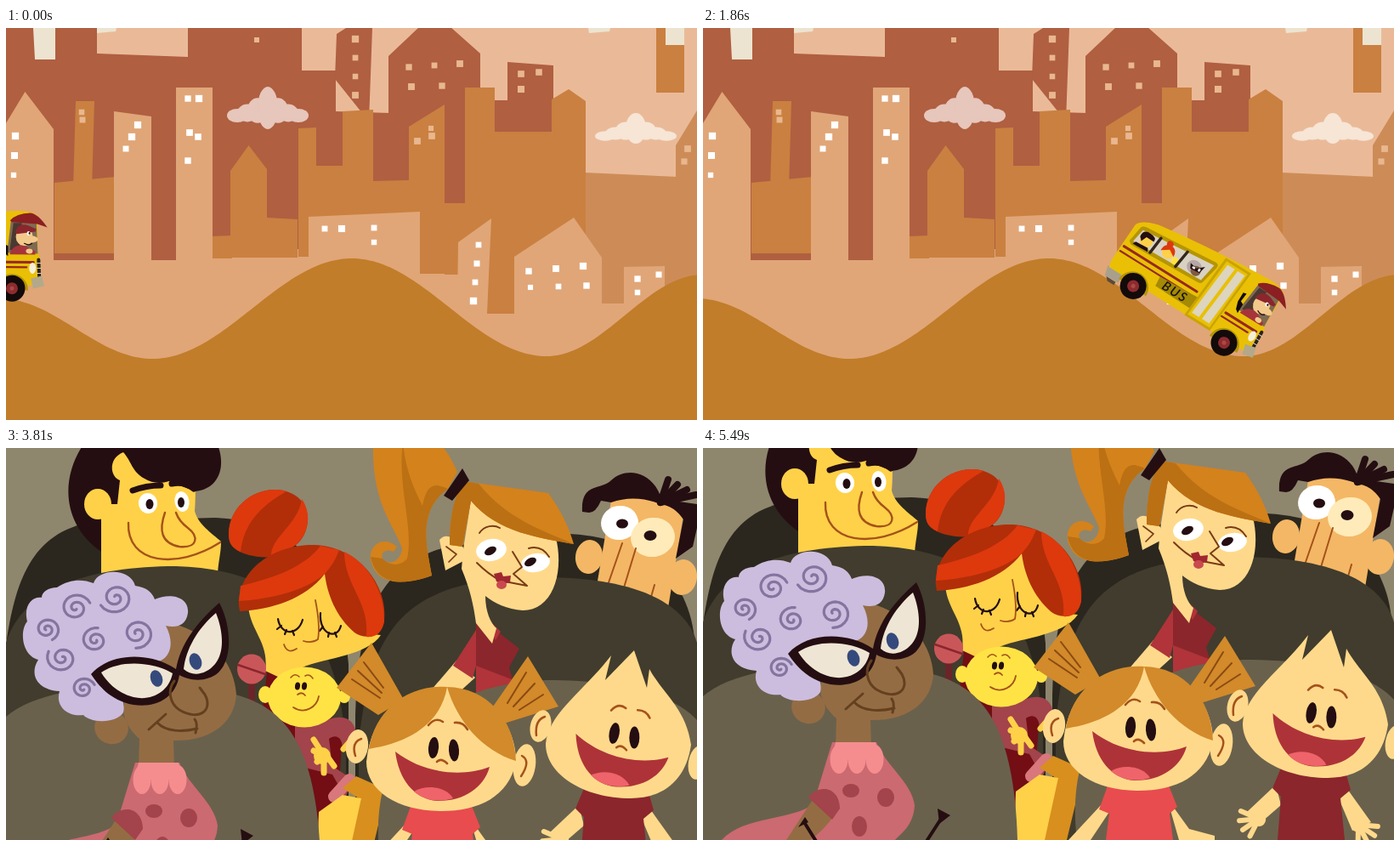
Write an HTML page that moves like this. It is 813 px wide and 461 px high and loops after 5590 ms.

```html
<!DOCTYPE html>
<html lang="en">
<head>
<meta charset="utf-8">
<title>Bus ride</title>
<style>
html, body { margin: 0; width: 100%; height: 100%; overflow: hidden; background: #8f866e; }
svg { display: block; width: 100%; height: 100%; }
text { font: italic 600 15px Lato, "Open Sans", sans-serif; letter-spacing: 2px; }
</style>
</head>
<body>
<svg id="stage" viewBox="0 0 813 461" preserveAspectRatio="none"></svg>
<script>
const LOOP = 5590, CUT = 3420;
const HILLS = [[-8, 318], [172, 389], [407, 271], [636, 386], [820, 290], [1100, 318]];
const DRIVE = [[0, -56], [750, 245], [1170, 370], [1440, 422], [1870, 626], [2430, 797], [2850, 932]];

const linear = s => s;
const wave = s => (1 - Math.cos(Math.PI * s)) / 2;
function along(keys, x, ease) {
  let i = 1;
  while (i < keys.length - 1 && x > keys[i][0]) i++;
  const [a, b] = [keys[i - 1], keys[i]];
  const s = Math.min(1, Math.max(0, (x - a[0]) / (b[0] - a[0])));
  return a[1] + (b[1] - a[1]) * ease(s);
}
const ground = x => along(HILLS, x, wave);
// The picture is held between steps of even length
const snap = (t, from, gap) => from + Math.floor((t - from) / gap) * gap;
const held = t => t < 750 ? snap(t, 0, 125) : t < CUT ? snap(t, 750, 140) : snap(t, CUT, 137);
const bounce = t => Math.min(24, Math.max(0, 12 + 16.5 * Math.cos(2 * Math.PI * (t - 4815) / 1160)));

let seed = 7;
const random = () => (seed = seed * 16807 % 2147483647) / 2147483647;

// Drawing helpers: filled path, line, ellipse, group
const p = (d, fill) => `<path d="${d}" fill="${fill}"/>`;
const l = (d, stroke, w = 2) =>
  `<path d="${d}" fill="none" stroke="${stroke}" stroke-width="${w}" stroke-linecap="round" stroke-linejoin="round"/>`;
const e = (x, y, rx, ry, fill, turn = 0) =>
  `<ellipse cx="${x}" cy="${y}" rx="${rx}" ry="${ry}" fill="${fill}" transform="rotate(${turn} ${x} ${y})"/>`;
const g = (id, ...parts) => `<g id="${id}">${parts.join('')}</g>`;
const at = (x, y, turn, ...parts) => `<g transform="translate(${x} ${y}) rotate(${turn})">${parts.join('')}</g>`;
const repeat = (n, draw) => Array.from({ length: n }, (_, i) => draw(i)).join('');

const C = { sky: '#eaba98', red: '#b05f41', mid: '#ca8040', tan: '#cd8c57', light: '#e0a678', hill: '#c17d29',
  cream: '#ece4d0', ink: '#240e11', skin: '#ffd98b', peach: '#f4b765', yellow: '#ffd148', baby: '#ffe344',
  wine: '#8b262c', crimson: '#b03439', line: '#a5521b', brown: '#946c44', rose: '#cb6a70', plum: '#a3434b',
  fire: '#dd390d', ember: '#b12e09', amber: '#d4821b', rust: '#bb7013', ginger: '#d28a2a' };

const tower = (fill, x, w, left, right, base, peak = (left + right) / 2, lean = 0.5) =>
  p(`M${x} ${left}L${x + w * lean} ${peak}L${x + w} ${right}V${base}H${x}Z`, fill);
const panes = (fill, x, y, dx, dy, n) => repeat(n, i => {
  const s = 6 + random() * 2.5;
  return `<rect x="${x + dx * i - s / 2}" y="${y + dy * i - s / 2}" width="${s}" height="${s}" fill="${fill}"/>`;
});
const cloud = (x, y, scale, fill) => repeat(7, i => {
  const k = Math.abs(i - 3);
  return e(x + 12 * (i - 3), y + 3 * k, 12, scale * 25 / (1 + 0.7 * k), fill);
});

function town() {
  let hill = 'M0 461';
  for (let x = 0; x <= 816; x += 4) hill += `L${x} ${ground(x).toFixed(1)}`;
  const { sky, red, mid, tan, light, cream } = C, pale = '#e9b78f', white = '#fff';
  return [
    p('M0 0H813V461H0Z', sky), p('M0 260H813V400H0Z', light),
    // far
    tower(red, 0, 107, 0, 0, 273), tower(red, 107, 107, 30, 34, 273), tower(red, 214, 134, 0, 0, 260),
    tower(red, 348, 40, 50, 50, 260), p('M387 60L389 7 400 0H431L427 110Z', red), tower(red, 387, 65, 98, 100, 260),
    tower(red, 450, 108, 33, 30, 260, -18), tower(red, 575, 15, 85, 85, 130), tower(red, 590, 54, 40, 44, 130),
    p('M32 0H58V37H34ZM107 0H130L129 4 107 6ZM685 0H711L710 4 686 6Z', cream),
    tower(mid, 765, 33, 0, 0, 76), tower(cream, 776, 22, 0, 0, 20),
    tower(tan, 681, 132, 170, 176, 324), tower(tan, 788, 25, 138, 97, 324),
    panes(pale, 295, 14, 0, 0, 1), panes(pale, 411, 13, 0, 22, 4), panes(pale, 474, 46, 30, -2, 3),
    panes(pale, 477, 69, 36, -1, 2), panes(pale, 606, 54, 21, -2, 2), panes(pale, 606, 72, 0, 0, 1),
    // middle
    tower(mid, 57, 72, 182, 175, 265), p('M79 190L82 86H104L101 190Z', mid),
    tower(mid, 242, 24, 245, 244, 271), tower(mid, 264, 43, 168, 166, 270, 138), tower(mid, 307, 36, 223, 225, 270),
    tower(mid, 344, 21, 118, 117, 269), tower(mid, 364, 33, 162, 162, 269), tower(mid, 396, 36, 98, 96, 269),
    tower(mid, 432, 42, 180, 179, 269), tower(mid, 474, 42, 116, 90, 289), tower(mid, 516, 24, 206, 206, 290),
    tower(mid, 540, 35, 70, 70, 336), tower(mid, 575, 68, 122, 122, 336), tower(mid, 642, 40, 84, 86, 300, 72),
    panes(pale, 89, 99, 1, 9, 2), panes(pale, 484, 133, 17, -6, 2), panes(pale, 500, 118, 0, 0, 1), panes(pale, 802, 142, -4, 15, 2),
    // near
    tower(light, 0, 56, 112, 119, 400, 75, 0.4), tower(light, 127, 44, 98, 104, 400), tower(light, 200, 43, 70, 70, 400),
    tower(light, 356, 131, 222, 216, 400), p('M530 400L532 252 571 224 566 336V400Z', light),
    tower(light, 598, 103, 269, 270, 400, 223, 0.68), tower(light, 727, 48, 281, 280, 400),
    panes(white, 11, 127, -1, 23, 3), panes(white, 214, 83, 13, 0, 2), panes(white, 216, 123, 10, 5, 2), panes(white, 214, 156, 0, 0, 1),
    panes(white, 155, 114, -7, 14, 3), panes(white, 375, 236, 20, 0, 2), panes(white, 433, 235, 0, 17, 2),
    panes(white, 556, 255, -2, 22, 4), panes(white, 615, 286, 32, -3, 3), panes(white, 617, 305, 33, -1, 3),
    panes(white, 743, 295, 25, -5, 2), panes(white, 743, 311, 0, 0, 1),
    cloud(308, 94, 1, '#e7c6bb'), cloud(741, 118, 0.72, '#f7e5d6'),
    p(hill + 'V461Z', C.hill)
  ].join('');
}

function bus() {
  const gold = '#e9c005', olive = '#b59505', stripe = '#96281f';
  const wheel = x => p(`M${x - 19} 2a19 19 0 0 1 38 0Z`, olive) +
    e(x, 0, 15.5, 15.5, '#130a0a') + e(x, 0, 7, 7, '#8e2b2e') + e(x, 0, 2.5, 2.5, '#a94a45');
  return [
    p('M-101 -5L-82 -7 -80 6 -98 7Z', '#a9a08c'), p('M-96 7H-83V11H-92Z', '#5b4a3c'),
    p('M-101 -12L-99 -62Q-97 -71 -75 -77Q-15 -86 60 -91Q88 -93 92 -85L93 -42Q97 -38 97 -8L88 -4H-99Z', gold),
    p('M-95 -43L-92 -63Q-91 -66 -86 -67L5 -75Q10 -75 9 -70L4 -47Q3 -44 -1 -44L-91 -40Z', olive),
    p('M-91 -45L-88 -62 5 -71 1 -48Z', '#d9d2c2'),
    // passengers
    e(-78, -53, 8, 7, C.yellow), p('M-87 -54Q-88 -64 -78 -63Q-69 -63 -70 -57L-80 -57 -83 -50Z', C.ink), p('M-88 -46L-72 -47 -70 -43 -90 -42Z', C.ink),
    e(-49, -54, 7, 6, C.yellow), p('M-58 -53Q-58 -64 -49 -64Q-41 -63 -41 -54L-49 -59Z', C.fire), e(-52, -65, 4, 3.5, C.fire),
    e(-37, -51, 5, 4.5, C.baby), e(-14, -57, 9, 8, '#b5a7a5'), e(-10, -54, 6, 6, '#7d5a43'),
    p('M-20 -59L-11 -57 -3 -64 -5 -54 -17 -53Z', C.ink), e(-14, -56, 2, 1.4, '#fff'), e(-7, -57, 1.5, 2, '#fff'),
    l('M-65 -65L-67 -44M-30 -68L-33 -46', '#33251d', 3.5),
    l('M-97 -34H4M46 -31H88', stripe, 3), l('M-98 -27H-1M44 -25H80', stripe, 2.2),
    p('M-42 -26L10 -29 7 -13 -41 -14Z', '#a48a05'),
    '<text x="-34" y="-15" fill="#19120a">BUS</text>',
    // door
    p('M12 -86H47L41 -3H6Z', '#c9a405'), p('M15 -83H44L39 -6H9Z', gold),
    repeat(2, i => p(`M${18 + 14 * i} -80h10l-6 70h-10Z`, '#ddd5bd')),
    // driver
    p('M61 -79L91 -79 93 -41 57 -42Z', '#7f6a52'), p('M64 -77L74 -77 71 -45 60 -45Z', '#4a3930'),
    e(77, -61, 10, 11, '#f3c98b'), e(86, -58, 7, 4, '#f3c98b'), p('M66 -66Q69 -78 82 -74L91 -70 90 -67 68 -64Z', C.wine),
    e(82, -65, 2, 2.5, '#fff'), e(83, -65, 1, 1.4, C.ink), l('M77 -53Q82 -50 86 -53', C.ink, 1.2),
    p('M61 -43Q66 -53 78 -50L90 -44 90 -40 60 -40Z', '#a6343b'), e(83, -44, 4, 3, '#f3c98b'),
    p('M60 -80Q67 -88 84 -89Q93 -88 104 -72L92 -76 62 -78Z', '#8b1f22'),
    p('M51 -62L55 -63 54 -52 58 -50 58 -38 54 -41 51 -50Z', '#130a0a'),
    e(87, -24, 4, 6.5, '#f5efd8'), l('M94 -34L95 -14', '#2d211b', 4), l('M92 -30H97M92 -24H97M92 -18H97', '#d9d2c2', 1),
    p('M85 -12L98 -15 101 -3 88 0Z', '#b3a98a'), wheel(-63), wheel(63)
  ].join('');
}

const eye = (x, y, rx, ry, px, py, prx, pry, turn, fill = '#fff') => e(x, y, rx, ry, fill, -10) + e(px, py, prx, pry, C.ink, turn);
const hand = (x, y, turn) => at(x, y, turn, e(0, 0, 8, 9, C.skin), repeat(4, i => {
  const a = (i - 1.5) * 0.5;
  return l(`M0 0L${23 * Math.cos(a)} ${23 * Math.sin(a)}`, C.skin, 6);
}));
function curl(x, y, r, turn) {
  let d = '';
  for (let i = 0; i <= 40; i++) {
    const a = turn + i * 0.28, k = r * (0.1 + 0.9 * i / 40);
    d += `${i ? 'L' : 'M'}${(x + k * Math.cos(a)).toFixed(1)} ${(y + k * 0.92 * Math.sin(a)).toFixed(1)}`;
  }
  return l(d, '#8474a0', 3.2);
}

const backRow = () => [
  p('M1 200C12 130 32 70 110 62L245 58C340 62 392 120 403 230V461H0Z', '#2b271e'),
  p('M411 461V290C414 190 430 115 520 92L640 77C720 74 800 105 810 200V461Z', '#2b271e'),
  // man with a black quiff
  p('M112 140V-20H222C222 0 224 30 222 50 226 66 242 76 253 86 253 104 248 112 249 140Z', C.yellow),
  p('M95 -34C62 10 66 66 112 98V42H131L134 14C122 10 120 -12 138 -19 148 -8 148 4 163 12Q176 20 192 15L222 27C254 24 260 -8 246 -34Z', C.ink),
  e(108, 42, 16, 18, C.yellow),
  l('M149 26Q165 20 182 20M195 18Q210 15 221 24', C.ink, 7),
  eye(167, 41, 11, 12, 169, 42, 4.5, 6, 0), eye(207, 39, 8.5, 12, 206, 40, 4, 6, 0),
  l('M187 52C180 72 182 88 204 92 226 94 227 80 214 70 206 64 202 58 200 52M144 64C142 112 200 120 252 87', C.line, 2.4),
  // man with round eyes
  p('M693 150L712 38Q760 26 797 55L778 170Z', C.peach), e(686, 104, 16, 20, C.peach, 8), e(796, 128, 17, 21, C.peach, 8),
  p('M678 51C676 16 700 26 712 14 730 -3 762 4 771 36L813 42V70L808 92 788 106 797 60Q786 44 770 42 740 30 712 40L700 38Q694 52 686 52Z', C.ink),
  repeat(4, i => l(`M770 40L${779 + 11 * i} ${13 + 6 * i}`, C.ink, 8)),
  eye(722, 64, 22, 20, 725, 65, 7, 5.5, 0), eye(761, 81, 26, 23, 758, 79, 7.5, 6, 0, '#ffebb9'),
  l('M725 88L707 140M741 94L724 150M763 137L757 158', C.line)
].join('');

const mother = () => [
  p('M300 300L308 232 342 240 396 310 388 430H340Z', '#720e14'),
  p('M285 160L376 120C384 168 404 194 441 196 424 222 366 224 347 235L322 246 305 238C310 204 286 190 285 160Z', C.yellow),
  p('M262 78C262 42 298 18 330 27 366 38 358 82 338 92 322 108 300 105 286 102 270 98 262 90 262 78Z', C.ember),
  p('M262 78C262 42 298 18 330 27 300 44 280 64 276 98 266 94 262 88 262 78ZM348 36C362 56 354 82 338 92L312 104C310 82 344 66 348 36Z', C.fire),
  p('M274 162C272 116 320 88 365 90 420 94 450 142 445 180 440 202 420 200 410 193 388 174 378 148 375 124 352 154 312 166 275 168Z', C.ember),
  p('M276 138C312 130 352 116 370 91L392 96C386 112 380 118 375 124 350 146 306 154 274 156ZM398 98C428 112 446 148 445 180 442 196 432 199 424 198 428 156 398 138 398 98Z', C.fire),
  l('M320 177C323 196 343 198 349 178M324 185L319 189M330 190L328 195M337 191L339 196M370 170C368 196 390 202 394 185M373 186L369 191M380 193L379 198M387 193L389 198', C.ink, 2.2),
  l('M364 155C368 175 369 190 367 201Q360 206 350 203M327 207Q331 219 342 212', C.line, 1.8),
  l('M289 240V275', '#6b2529', 8), e(289, 236, 17, 17.5, '#c9575a'), l('M273 231L305 242', C.wine, 2.5),
  // baby on her lap
  p('M340 296H378C402 286 414 300 412 320L396 330C396 316 388 312 380 318L384 350 408 366 398 390 376 400 340 380Z', C.plum),
  p('M344 350L384 360 402 392 362 410Z', '#720e14'), l('M386 386L404 366', '#d8777c', 14),
  p('M398 461L415 388 396 376 412 362 448 378 428 461Z', '#d88f1e'), p('M366 461L368 404 396 384 418 388 402 461Z', C.yellow),
  e(372, 338, 10, 10, C.yellow), repeat(4, i => l(`M374 338L${362 + i * i * 2 - i * 2} ${319 + i * 13}`, C.yellow, 7)),
  l('M376 336L386 350M397 330L404 322', C.yellow, 7),
  g('baby', e(305, 266, 8, 10, C.baby), e(398, 268, 7, 8, C.baby), e(351, 269, 43, 35.5, C.baby),
    g('awake', e(343, 256, 3, 4.5, C.ink, 8), e(351, 256, 3, 4.5, C.ink, 8), l('M335 246Q340 240 345 245M352 244Q357 241 361 247', C.line, 1.6)),
    g('asleep', l('M337 254Q342 248 348 254M351 253Q356 248 361 254M338 261Q344 257 350 262', C.line, 1.8)),
    l('M343 266Q348 262 352 267M338 281C352 290 366 280 368 268', C.line, 1.8))
].join('');

const ponytail = () => [
  p('M530 226L552 246 520 275H488Z', C.skin), p('M553 178L576 190 604 212 592 234 600 262H553Z', C.wine),
  p('M553 190L526 232 549 247 553 232 600 250V265H553ZM566 184L576 202 582 192 572 182Z', C.crimson),
  p('M538 95L547 38 640 78 648 86C656 126 642 167 608 167 590 166 574 158 564 150 564 168 570 182 577 188L572 206 553 182C550 160 546 142 536 118Z', C.skin),
  p('M538 93Q520 72 510 84L517 120 540 108Z', C.skin), l('M518 92L530 101 521 110', '#7a3b16', 1.7),
  p('M432 -28C430 40 456 66 466 94 464 112 448 114 443 106 440 98 448 94 456 98L460 92C444 78 426 90 429 108 436 138 468 138 501 126 496 96 482 50 520 24L531 4C524 -12 514 -28 505 -34Z', C.amber),
  p('M467 -30C460 20 480 70 472 106 464 116 450 114 443 106L429 104C436 138 468 138 501 126 496 96 482 50 520 24 500 14 494 24 490 44 478 20 470 0 467 -30Z', C.rust),
  p('M522 90C522 50 530 20 545 16L638 29C652 48 662 68 668 89 630 82 578 76 547 38L537 92Z', C.amber),
  p('M522 90C522 50 530 20 545 16L556 18C590 60 630 72 668 89 630 82 578 76 547 38L537 92Z', C.rust),
  p('M515 32L537 0 545 14 525 38Z', C.ink),
  eye(571, 96, 18, 13, 570, 97, 7.5, 4.5, -28), eye(623, 111, 17, 11, 617, 110, 7.5, 4.5, -28),
  l('M557 76C563 67 574 66 581 70M615 94Q630 90 639 104M596 98L607 116 597 124 613 138 587 133M554 111C566 123 574 128 582 132', '#7a3b16'),
  p('M574 124L583 122 585 127 594 126 593 134 584 136 577 133Z', '#a02730'), e(583, 137, 6, 5, '#c84a4e')
].join('');

const grandma = () => [
  p('M22 461C48 432 108 438 130 418L152 346H204C214 372 246 394 249 420 248 444 232 454 226 461Z', C.rose),
  p('M150 180L185 180C232 188 268 222 271 266 268 306 232 321 197 320L198 352H156L157 318C148 310 140 300 138 285Z', C.brown),
  e(124, 305, 20, 19, C.brown, 25),
  p('M156 346H203L209 366H151Z', '#f58d8f'), repeat(3, i => e(160 + 21 * i, 366, 10.5, 17, '#f58d8f')),
  e(174, 403, 10, 8, C.plum), e(215, 411, 10, 11, C.plum), e(184, 445, 9, 12, C.plum),
  p('M130 412L156 430Q142 450 126 461H98Z', C.brown), p('M124 411C134 396 160 396 161 424L152 437Z', C.plum),
  l('M119 440L134 464M262 464L282 433', C.ink, 4), p('M112 446L120 434 124 440ZM276 424L291 432 278 442Z', C.ink),
  p('M60 140C75 130 90 130 103 135 108 118 146 116 152 138 166 140 172 146 175 154 192 146 216 150 214 170 212 185 200 188 188 185 198 204 194 220 182 226L104 238C128 250 142 272 138 287 130 300 100 300 91 290 70 292 58 278 63 262 34 260 28 240 38 225 18 220 16 190 25 180 20 160 32 150 42 152 42 145 50 140 60 140Z', '#ccbdde'),
  curl(82, 164, 18, 1), curl(129, 152, 20, 4), curl(48, 189, 15, 2.5), curl(105, 202, 16, 0),
  curl(154, 194, 19, 3), curl(66, 223, 18, 5), curl(91, 259, 14, 1),
  p('M100 242C122 217 168 215 200 236 206 204 226 180 251 158 264 182 268 222 250 240 236 252 216 250 204 243 200 270 176 282 150 278 122 273 108 254 100 242Z', C.ink),
  p('M112 240C135 224 175 228 196 241 192 262 172 274 150 269 130 264 118 250 112 240ZM209 236C212 210 228 186 247 170 255 190 258 215 246 230 236 242 220 246 209 236Z', '#efe5d4'),
  g('gaze', e(177, 247, 7, 10, '#354a7c', -18), e(223, 227, 7, 10, '#354a7c', -18)),
  l('M198 250C190 260 192 276 204 284 228 298 244 284 234 266L228 258M168 307L188 289M178 299C188 310 208 310 225 306M222 295Q226 300 223 311', '#64401f', 3)
].join('');

// Both children share one laughing face
const laugh = (x, y, turn) => at(x, y, turn,
  l('M-18 -28Q-10 -38 -1 -32M13 -31Q23 -32 28 -23M-8 15Q-3 10 4 17', C.line, 2.6),
  e(-12, -1.5, 6, 12.5, C.ink, 5), e(12, 1.5, 6, 13, C.ink, -4),
  p('M-57 3C-25 28 20 34 54 21 47 46 23 62 -9 61 -35 58 -53 36 -57 3Z', '#ae3338'),
  p('M-35 50C-21 41 3 44 11 58 -5 63 -23 61 -35 50Z', '#ee646a'));

const kids = () => [
  // girl
  p('M430 205L468 272 438 290 389 258ZM614 221L650 280 576 303 566 290Z', C.ginger),
  repeat(3, i => l(`M${421 - 7 * i} ${228 + 10 * i}L${444 - 2 * i} ${258 + 6 * i}M${612 + 10 * i} ${240 + 13 * i}L${590 + 7 * i} ${276 + 4 * i}`, '#8b4a14')),
  p('M470 418L478 428 456 461H430ZM546 412L572 448 602 456V461H560Z', C.skin),
  p('M478 392H546L558 422 549 430 553 461H474L478 430 466 425Z', '#e84c4e'),
  e(413, 327, 13, 20, C.skin, 8), e(610, 349, 13, 25, C.skin, 8),
  p('M424 345C430 285 470 258 515 258 566 258 600 300 600 345 592 386 556 403 512 403 462 403 424 380 424 345Z', C.skin),
  p('M519 257C470 254 434 286 427 330 478 322 512 298 519 257ZM519 257C566 258 598 294 600 344 560 332 530 296 519 257Z', C.ginger),
  l('M418 318Q406 322 411 338M607 338Q618 344 606 362', C.line, 2.5),
  laugh(515, 330, 0),
  // boy
  p('M674 396L640 428 650 446 680 420ZM756 398L786 440 764 450 748 412Z', C.skin),
  hand(654, 436, 160), hand(771, 443, 48),
  p('M681 374H754L762 402 750 412 755 461H676L680 410 670 400Z', C.wine),
  e(629, 303, 12, 19, C.skin, 14), e(814, 346, 11, 20, C.skin, 10),
  p('M635 324C638 288 680 262 712 220L705 249 739 214 754 258 757 236C772 264 800 282 806 325 800 368 772 388 735 388 680 388 635 360 635 324Z', C.skin),
  l('M634 292Q622 296 624 314', C.line, 2.5),
  laugh(727.5, 314, 5)
].join('');

const inside = () => p('M0 0H813V461H0Z', '#8f866e') + g('ride', backRow(),
  p('M0 205C20 140 100 115 200 115 330 118 396 190 400 340V461H0Z', '#413c2d'),
  p('M415 461V320C430 200 455 128 630 128 745 128 800 160 813 205V461Z', '#413c2d'),
  mother(), ponytail(),
  p('M0 292C30 265 100 255 150 255L270 266C330 282 366 328 370 461H0Z', '#6a614c'),
  p('M440 461C420 300 540 249 645 249 735 250 790 270 813 296V461Z', '#6a614c'),
  grandma(), kids(), p('M0 461H813V490H0Z', '#6a614c'));

stage.innerHTML = g('street', town(), g('bus', bus())) + g('cabin', inside());
const el = id => document.getElementById(id);
const show = (id, on) => el(id).setAttribute('display', on ? 'inline' : 'none');
const place = (id, value) => el(id).setAttribute('transform', value);

function driveBus(t) {
  const x = along(DRIVE, t, linear);
  let angle = 0, rear, front;
  for (let i = 0; i < 8; i++) {
    const half = 63 * Math.cos(angle);
    rear = ground(x - half);
    front = ground(x + half);
    angle = Math.atan2(front - rear, 2 * half);
  }
  place('bus', `translate(${x} ${(rear + front) / 2 - 13}) rotate(${angle * 180 / Math.PI})`);
}

function draw(time) {
  const t = held(time), riding = time >= CUT;
  show('street', !riding);
  show('cabin', riding);
  if (!riding) return driveBus(t);
  const blink = t > 4300 && t < 4450;
  const dip = `translate(0 ${blink ? 3 : 0})`;
  place('ride', `translate(0 ${bounce(t)})`);
  place('baby', dip);
  place('gaze', dip);
  show('awake', !blink);
  show('asleep', blink);
}

const start = performance.now();
function tick() {
  draw((performance.now() - start) % LOOP);
  requestAnimationFrame(tick);
}
tick();
</script>
</body>
</html>
```
